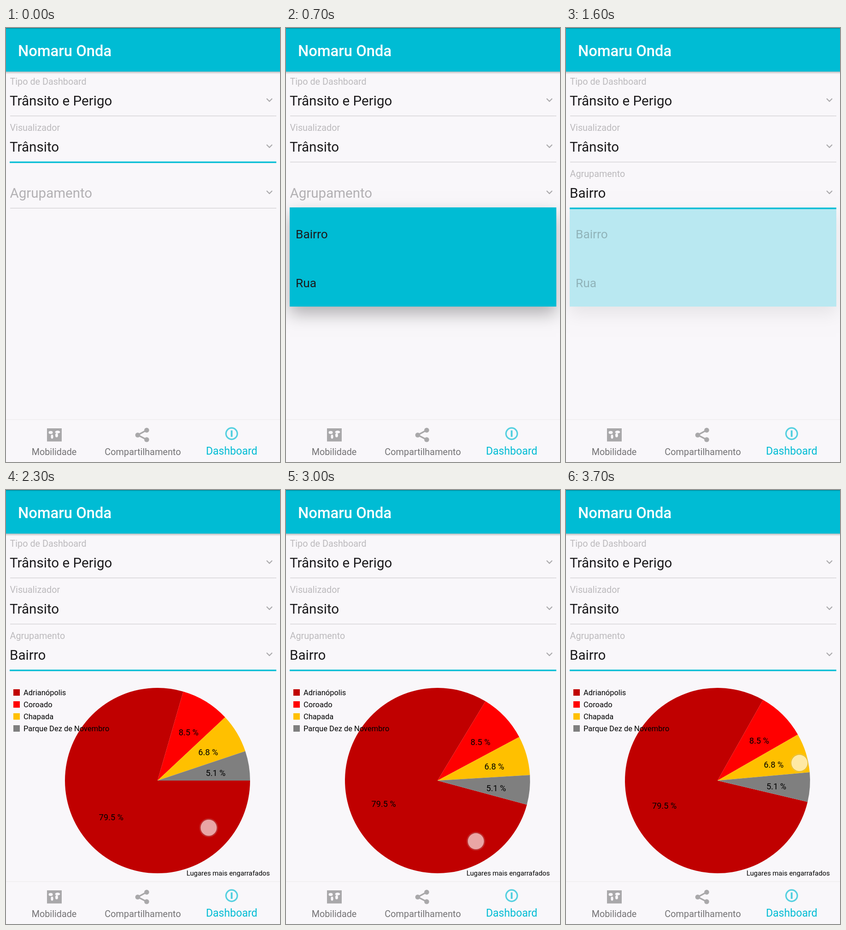
Recreate the animation shown at these times as an HTML page with a canvas. Size 595 by 941 pixels, loop 3.8 s.

```html
<!DOCTYPE html>
<html lang="pt">
<head>
<meta charset="utf-8">
<title>Dashboard</title>
<style>
html, body { margin: 0; width: 100%; height: 100%; overflow: hidden; background: #f9f7fa; }
canvas { display: block; width: 595px; height: 941px; }
</style>
</head>
<body>
<canvas id="stage" width="595" height="941"></canvas>
<script>
const ctx = document.getElementById('stage').getContext('2d');
const LOOP = 3800, STEP = 100;
const W = 595, H = 941, LEFT = 8, WIDTH = 579;
const TEAL = '#00bcd4', BG = '#f9f7fa', INK = '#1b1a1c', ICON = '#a9a8aa';
const PIE = { x: 329, y: 630, r: 201 };
const SLICES = [
  { name: 'Adrianópolis', count: 93, share: '79.5 %', color: '#c00000' },
  { name: 'Coroado', count: 10, share: '8.5 %', color: '#ff0000' },
  { name: 'Chapada', count: 8, share: '6.8 %', color: '#ffc000' },
  { name: 'Parque Dez de Novembro', count: 6, share: '5.1 %', color: '#7f7f7f' }
];
const TOTAL = SLICES.reduce((sum, s) => sum + s.count, 0);

const lerp = (a, b, p) => a + (b - a) * p;
const rad = deg => deg * Math.PI / 180;
const ramp = (t, from, to) => Math.min(1, Math.max(0, (t - from) / (to - from)));
const smooth = (t, from, to) => { const u = ramp(t, from, to); return u * u * (3 - 2 * u); };
const easeOut = (t, from, to) => 1 - (1 - ramp(t, from, to)) ** 3;
const pulse = (t, from, to) => ramp(t, from, from + 200) * (1 - ramp(t, to - 200, to));

// Finger drag: forwards, back again, then a second short pull
const spinAt = t => 39.7 * smooth(t, 2300, 2750) - 34.7 * smooth(t, 2750, 3138) + 8.3 * smooth(t, 3500, 3700);
const reachAt = t => 151 + 25 * smooth(t, 2300, 2700) - 24 * smooth(t, 2700, 3100);

function rect(x, y, w, h, color) {
  ctx.fillStyle = color;
  ctx.fillRect(x, y, w, h);
}

function text(str, x, y, size, color, align = 'left', weight = 400) {
  ctx.font = `${weight} ${size}px Roboto, sans-serif`;
  ctx.textAlign = align;
  ctx.fillStyle = color;
  ctx.fillText(str, x, y);
}

function blob(x, y, rx, ry, color) {
  ctx.fillStyle = color;
  ctx.beginPath();
  ctx.ellipse(x, y, rx, ry, 0, 0, 2 * Math.PI);
  ctx.fill();
}

const disc = (x, y, r, color) => blob(x, y, r, r, color);

function ring(x, y, r, width, color) {
  ctx.strokeStyle = color;
  ctx.lineWidth = width;
  ctx.beginPath();
  ctx.arc(x, y, r, 0, 2 * Math.PI);
  ctx.stroke();
}

function line(points, width, color) {
  ctx.strokeStyle = color;
  ctx.lineWidth = width;
  ctx.beginPath();
  points.forEach(([x, y]) => ctx.lineTo(x, y));
  ctx.stroke();
}

function header() {
  const shade = ctx.createLinearGradient(0, 94, 0, 100);
  shade.addColorStop(0, 'rgba(0,0,0,.25)');
  shade.addColorStop(1, 'rgba(0,0,0,0)');
  rect(0, 94, W, 6, shade);
  rect(0, 0, W, 94.5, TEAL);
  rect(0, 0, W, 2, '#0097a9');
  text('Nomaru Onda', 26, 61, 32.8, '#fff', 'left', 500);
}

// float: 0 = label rests as placeholder, 1 = label sits above the value
function field(y, label, value, float) {
  text(label, 8.5, lerp(y - 22, y - 67, float), lerp(29.5, 19.8, float), float < 1 ? '#b3b1b4' : '#bcbabd');
  if (value) text(value, 8, y - 22, 29.6, INK);
  line([[566, y - 37], [572, y - 31], [578, y - 37]], 2.2, '#aaa8ab');
  rect(9, y, 578, 1.2, '#cfcdd0');
}

function underline(y, focus) {
  const w = WIDTH * focus;
  rect(LEFT + (WIDTH - w) / 2, y - 0.5, w, 3.2, TEAL);
}

// The shadow is clipped to the outside so it never shows through the fading panel
function menuShadow(top, height) {
  ctx.save();
  ctx.beginPath();
  ctx.rect(-W, 0, 3 * W, H);
  ctx.rect(LEFT, top, WIDTH, height);
  ctx.clip('evenodd');
  ctx.shadowColor = 'rgba(0,0,0,.29)';
  ctx.shadowBlur = 34;
  ctx.shadowOffsetY = 16;
  rect(LEFT, top, WIDTH, height, TEAL);
  ctx.restore();
}

function menu(open, alpha) {
  const top = 389, height = 215, pivot = 218, scale = lerp(0.874, 1, open);
  ctx.save();
  ctx.globalAlpha = alpha;
  ctx.translate(pivot, top);
  ctx.scale(scale, scale);
  ctx.translate(-pivot, -top);
  menuShadow(top, height);
  rect(LEFT, top, WIDTH, height, TEAL);
  ['Bairro', 'Rua'].forEach((item, i) => text(item, 21, 456 + 105.5 * i, 26.3, INK));
  ctx.restore();
}

function chart(spin) {
  const { x, y, r } = PIE;
  let angle = spin;
  const mids = SLICES.map(s => {
    const end = angle + 360 * s.count / TOTAL, mid = rad((angle + end) / 2);
    ctx.fillStyle = s.color;
    ctx.beginPath();
    ctx.moveTo(x, y);
    ctx.arc(x, y, r, rad(angle), rad(end));
    ctx.fill();
    angle = end;
    return mid;
  });
  SLICES.forEach((s, i) => {
    text(s.share, x + 1 + 127 * Math.cos(mids[i]), y + 10 + 127 * Math.sin(mids[i]), 18.2, '#000', 'center');
    rect(16, 432 + 26 * i, 14, 14, s.color);
    text(s.name, 38, 445 + 26 * i, 16.5, '#000');
  });
  text('Lugares mais engarrafados', 573, 836, 14.9, '#000', 'right');
}

function mapIcon() {
  rect(89, 868, 32, 28.5, ICON);
  blob(97, 877, 4.5, 3.2, BG);
  blob(100, 886, 2.6, 4.5, BG);
  blob(112, 876, 5.5, 3, BG);
  blob(110, 883, 3, 4.5, BG);
}

function shareIcon() {
  const tips = [[305.5, 872], [286, 882.5], [305.5, 892.5]];
  line(tips, 3.2, ICON);
  tips.forEach(([x, y]) => disc(x, y, 5.3, ICON));
}

function infoIcon() {
  const color = '#55d0e0';
  ring(490, 879.5, 12.3, 3.2, color);
  rect(488, 872.5, 4, 14, color);
}

function nav() {
  rect(0, 848.5, W, 1.5, '#efedf0');
  mapIcon();
  shareIcon();
  infoIcon();
  text('Mobilidade', 104.5, 925.5, 19.8, '#747375', 'center');
  text('Compartilhamento', 297, 925.5, 19.9, '#747375', 'center');
  text('Dashboard', 490, 925, 23.1, TEAL, 'center');
}

function touch(x, y, strength) {
  ctx.save();
  ctx.globalAlpha = 0.6 * strength;
  disc(x, y, 20.5, 'rgba(255,255,255,.2)');
  disc(x, y, 17.5, '#fff');
  ring(x, y, 18.5, 1.2, 'rgba(110,130,135,.4)');
  ctx.restore();
}

function touchPie(deg, reach, strength) {
  touch(PIE.x + reach * Math.cos(rad(deg)), PIE.y + reach * Math.sin(rad(deg)), strength);
}

function draw(t) {
  const spin = spinAt(t);
  const open = easeOut(t, 210, 610);
  rect(0, 0, W, H, BG);
  header();
  field(190, 'Tipo de Dashboard', 'Trânsito e Perigo', 1);
  field(290, 'Visualizador', 'Trânsito', 1);
  field(390, 'Agrupamento', t >= 1600 ? 'Bairro' : '', smooth(t, 1400, 1600));
  if (t < 300) underline(290, 1);
  if (t >= 1800) chart(spin);
  nav();
  menu(open, open * (1 - smooth(t, 1400, 1700)));
  underline(390, smooth(t, 100, 400));
  touch(532, 356, pulse(t, 0, 500));
  touch(486, 436, pulse(t, 1100, 1500));
  touchPie(42.6 + spin, reachAt(t), pulse(t, 2100, 3350));
  touchPie(spin - 25.4, 182, pulse(t, 3300, 4000));
}

function tick() {
  const t = performance.now() % LOOP;
  draw(Math.floor(t / STEP) * STEP);
  requestAnimationFrame(tick);
}
tick();
</script>
</body>
</html>
```
